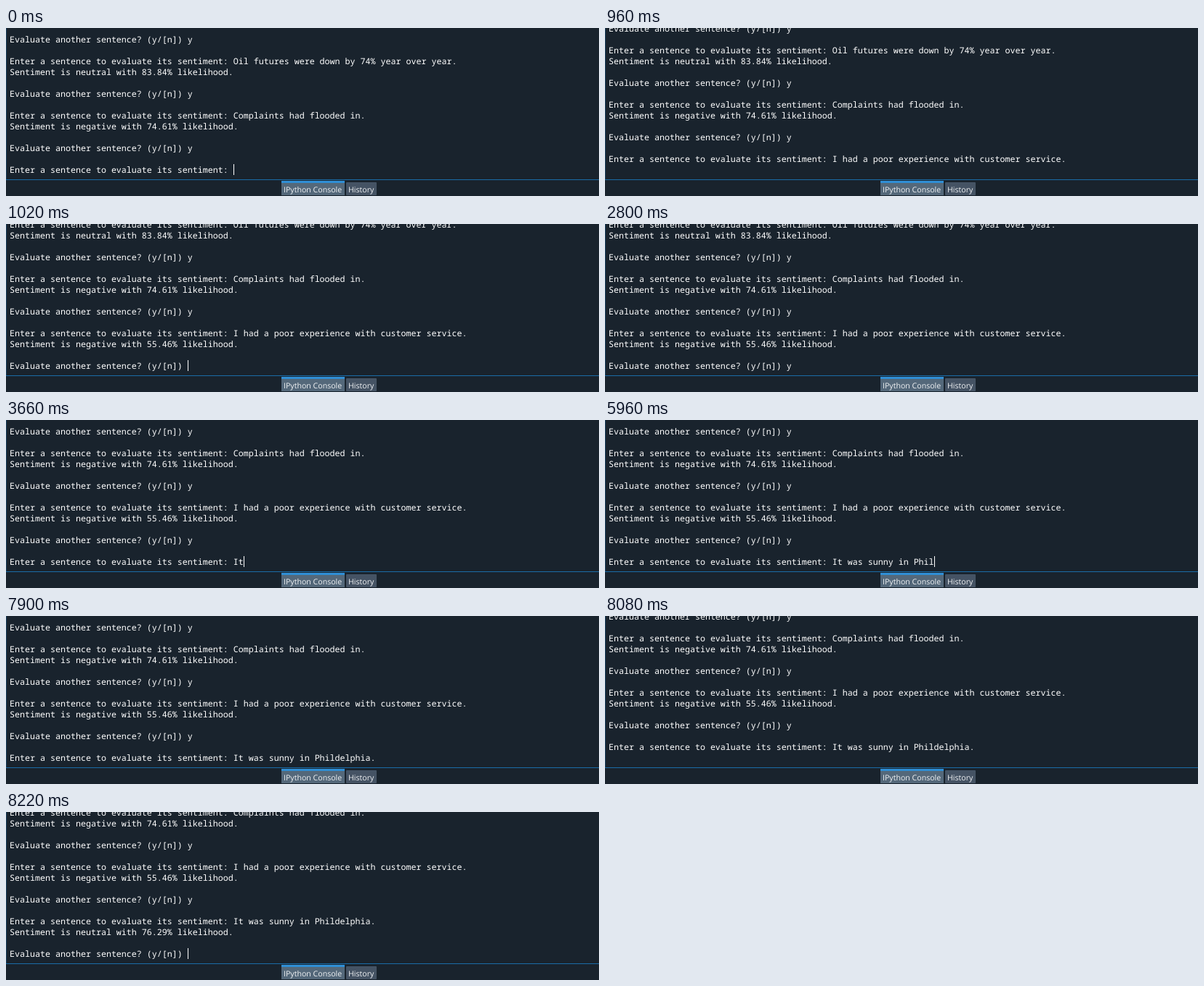
These frames come from a looping animation (816x232 px, 8240 ms). An HTML page:

```html
<!DOCTYPE html>
<html lang="en">
<head>
<meta charset="utf-8">
<title>Sentiment console</title>
<style>
  html, body { margin: 0; width: 100%; height: 100%; overflow: hidden; background: #19232d; }
  svg { display: block; }
  text { white-space: pre; fill: #fff; }
  #rows text { font: 11.667px "Noto Sans Mono", "DejaVu Sans Mono", monospace; text-rendering: geometricPrecision; }
  #tabs text { font: 10.6px "Open Sans", "Noto Sans", sans-serif; fill: #f0f2f4; text-rendering: geometricPrecision; }
</style>
</head>
<body>
<svg width="816" height="232" viewBox="0 0 816 232">
  <rect width="816" height="232" fill="#19232d"/>
  <g id="rows"></g>
  <rect id="caret" y="188" width="1" height="15" fill="#fff"/>
  <rect width="1" height="209" fill="#1464a0" opacity=".4"/>
  <rect y="209" width="816" height="1" fill="#1a6ca8"/>
  <g id="tabs">
    <rect x="379" y="211" width="87" height="20" fill="#54687a"/>
    <rect x="379" y="211" width="87" height="3" fill="#2f8fd6"/>
    <rect x="468" y="213" width="42" height="18" rx="1" fill="#455364"/>
    <text x="382" y="227">IPython Console</text>
    <text x="471" y="227">History</text>
  </g>
</svg>
<script>
const LOOP = 8240, LINE = 15, CHAR = 7, LEFT = 5, LAST_BASE = 200, ROWS = 14;
const AGAIN = "Evaluate another sentence? (y/[n]) ";
const ASK = "Enter a sentence to evaluate its sentiment: ";
const verdict = (mood, pct) => `Sentiment is ${mood} with ${pct}% likelihood.`;

const PASTED = "I had a poor experience with customer service.";
const TYPED = "It was sunny in Phildelphia. ";
const keyTimes = [
  3440, 3660, 3740, 3900, 3980, 4060, 4160, 4260, 4380, 4500,
  4660, 4860, 4960, 5060, 5160, 5280, 5460, 5660, 5700, 5960,
  6060, 6260, 6500, 6800, 7000, 7100, 7200, 7420, 7540
];
// The caret flips at each of these times, starting visible.
const caretFlips = [
  0, 140, 1000, 1640, 2280, 2780, 2820, 3460, 3660, 4090, 4160, 4720,
  4860, 5360, 5460, 6000, 6060, 6640, 6800, 7280, 7420, 7900, 8200
];
const history = [
  AGAIN + "y", "",
  ASK + "Oil futures were down by 74% year over year.",
  verdict("neutral", "83.84"), "",
  AGAIN + "y", "",
  ASK + "Complaints had flooded in.",
  verdict("negative", "74.61"), "",
  AGAIN + "y", ""
];

const passed = (times, t) => times.filter(at => at <= t).length;

function transcript(t) {
  const out = [...history, ASK + (t >= 360 ? PASTED : "")];
  if (t >= 1000) out.push(verdict("negative", "55.46"), "", AGAIN + (t >= 2440 ? "y" : ""));
  else if (t >= 820) out.push("");
  if (t >= 2820) out.push("", ASK + TYPED.slice(0, passed(keyTimes, t)));
  if (t >= 8200) out.push(verdict("neutral", "76.29"), "", AGAIN);
  else if (t >= 8080) out.push("");
  return out;
}

const group = document.getElementById("rows");
const caret = document.getElementById("caret");
const rows = Array.from({ length: ROWS }, (_, i) => {
  const row = document.createElementNS("http://www.w3.org/2000/svg", "text");
  row.setAttribute("x", LEFT);
  row.setAttribute("y", LAST_BASE - i * LINE);
  return group.appendChild(row);
});

function draw(t) {
  const lines = transcript(t).reverse();
  rows.forEach((row, i) => {
    const text = lines[i] || "";
    if (row.textContent !== text) row.textContent = text;
  });
  caret.setAttribute("x", LEFT + lines[0].length * CHAR);
  caret.setAttribute("opacity", passed(caretFlips, t) % 2);
}

let start;
function tick(now) {
  start ??= now;
  draw((now - start) % LOOP);
  requestAnimationFrame(tick);
}
draw(0);
requestAnimationFrame(tick);
</script>
</body>
</html>
```
